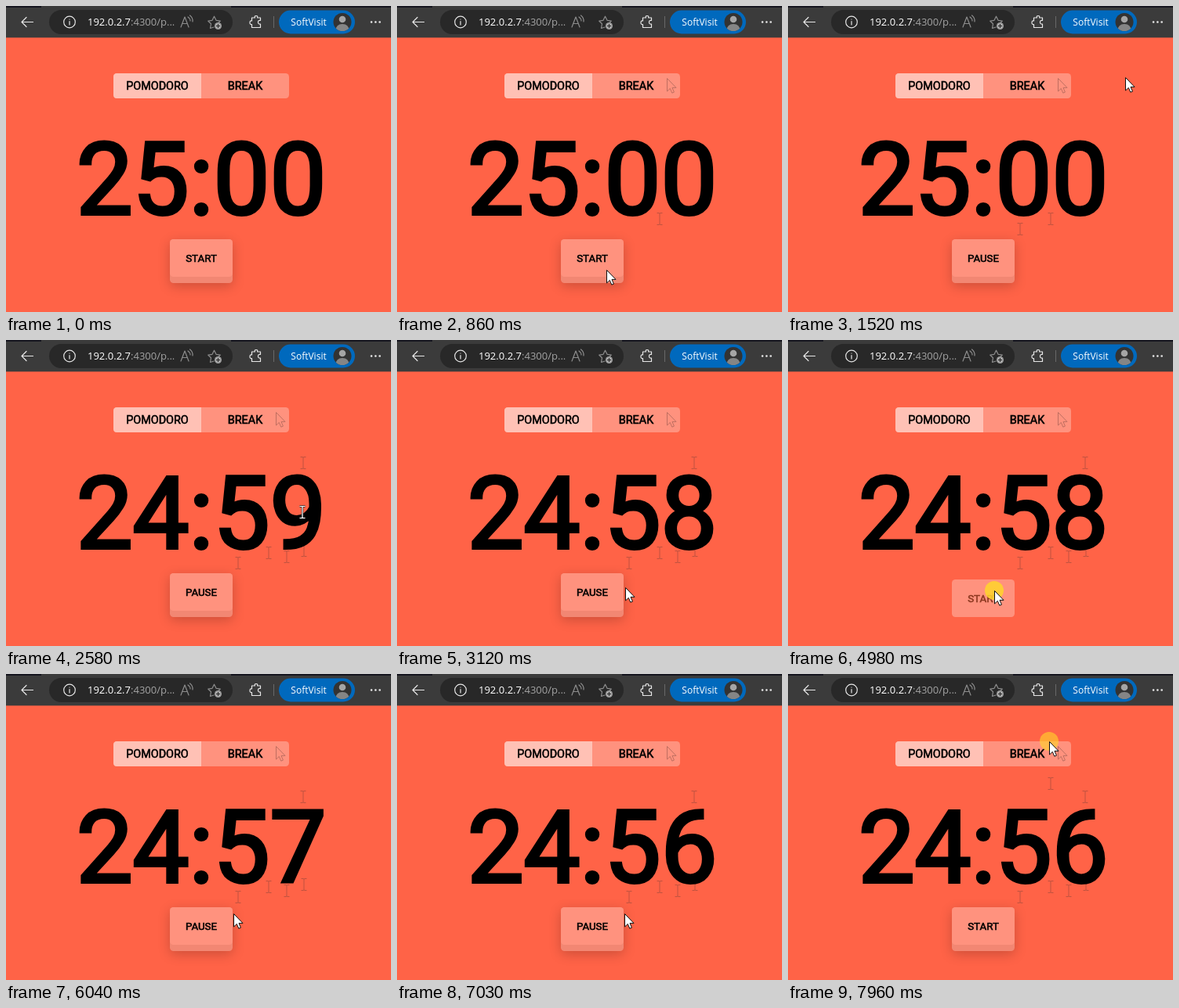
An HTML page for the animation above (8000 ms loop, 491 px wide and 391 px high).

```html
<!DOCTYPE html>
<html lang="en">
<head>
<meta charset="utf-8">
<title>Pomodoro timer</title>
<style>
  html, body { margin: 0; width: 100%; height: 100%; overflow: hidden; background: #ff6347; }
  svg { display: block; width: 100%; height: 100%; }
  .ui { font-family: "Open Sans", "Noto Sans", sans-serif; }
  .line { fill: none; stroke: #e6e6e6; stroke-width: 1.2; stroke-linecap: round; stroke-linejoin: round; }
  .dim { stroke: #8c8c8c; }
  /* Regular weight thickened by an outline, like a synthetic bold */
  .app { font-family: Roboto, sans-serif; font-weight: 400; text-anchor: middle; stroke-linejoin: miter; }
  .tab { font-size: 14.4px; stroke: #000; stroke-width: .57; }
  #label { font-size: 13.333px; stroke-width: .54; }
  #clock { font-size: 128px; stroke: #000; stroke-width: 4; }
</style>
</head>
<body>
<svg viewBox="0 0 491 391" xmlns="http://www.w3.org/2000/svg">
  <defs>
    <filter id="soft" x="-50%" y="-50%" width="200%" height="200%"><feGaussianBlur stdDeviation="8"/></filter>
    <clipPath id="face"><circle cx="429" cy="20.5" r="11.5"/></clipPath>
    <path id="arrow" d="M.5 .5V17L4.300 13.400 6.800 19.200 9.400 18.100 7 12.400H12Z"/>
    <path id="beam" d="M-3.5 -7.5H-1Q0 -7.5 0 -6.5Q0 -7.5 1 -7.5H3.5M0 -6.5V6.5M-3.5 7.5H-1Q0 7.5 0 6.5Q0 7.5 1 7.5H3.5" fill="none"/>
  </defs>

  <rect width="491" height="391" fill="#ff6347"/>

  <g class="ui">
    <rect width="491" height="40.400" fill="#3b3b3b"/>
    <path d="M0 0H45V2H0ZM287 0H491V2H287Z" fill="#15151f"/>
    <rect x="55" y="5" width="234" height="31" rx="15.5" fill="#282828"/>
    <path class="line" d="M34.500 20.500H20M26 14.500L20 20.500L26 26.500"/>
    <circle class="line" cx="81" cy="20.500" r="7.300"/>
    <path class="line" d="M81 19.500V24M81 17V17.100"/>
    <text x="104" y="25" font-size="13" fill="#fff">192.0.2.7<tspan fill="#a3a3a3">:4300/p...</tspan></text>
    <path class="line dim" d="M223 27L228 14L233 27M225 22.500H231M232 14Q235 16 235 19M234.500 12Q238.500 15 238 20"/>
    <path class="line dim" d="M265 27L260.500 28.500L261.500 22.700L257.800 19.200L263 18.300L265.500 13.200L268 18.300L273.300 19.200L271 21.500"/>
    <circle cx="270.500" cy="25.500" r="4.500" fill="#a3a3a3"/>
    <path d="M268 25.500H273M270.500 23V28" stroke="#282828"/>
    <path class="line" transform="translate(1.500 0)" d="M312 15H316Q315 12.500 317.500 12.500T319 15H323V18.500Q320 18 320 20.700T323 23V27.500H312V23.500Q309.500 24 309.500 21.200T312 19Z"/>
    <path d="M341.500 13V28" stroke="#686868"/>
    <rect x="348" y="5.500" width="97" height="30" rx="15" fill="#0069bd"/>
    <text x="386" y="25" font-size="12" fill="#fff" text-anchor="middle">SoftVisit</text>
    <g clip-path="url(#face)">
      <rect x="417" y="8" width="24" height="25" fill="#333"/>
      <circle cx="429" cy="17" r="4.300" fill="#a5a5a5"/>
      <path d="M420 34Q420 23 429 23T438 34Z" fill="#858585"/>
    </g>
    <path class="line" d="M466 20.500h.1m5.200 0h.1m5.200 0h.1" style="stroke-width:2.600"/>
  </g>

  <g class="app">
    <rect x="137" y="86" width="224" height="32" rx="4.500" fill="#ff927e"/>
    <path d="M249 86H141.500Q137 86 137 90.500V113.500Q137 118 141.500 118H249Z" fill="#ffc1b5"/>
    <text class="tab" x="193" y="107">POMODORO</text>
    <text class="tab" x="305" y="107">BREAK</text>

    <g id="raised">
      <rect x="209" y="302" width="80" height="56" rx="4.500" opacity=".2" filter="url(#soft)"/>
      <rect x="209" y="298" width="80" height="56" rx="4.500" fill="#f28773"/>
    </g>
    <g id="button">
      <rect x="209" y="298" width="80" height="48" rx="4.500" fill="#ff927e"/>
      <text id="label" x="249" y="327"></text>
    </g>
  </g>

  <g id="trail" stroke="#5f3a35" fill="none" opacity=".4"></g>
  <text id="clock" class="app" x="249" y="266"></text>

  <circle id="ring" r="12" fill="#ffd52a"/>
  <g id="pointer">
    <use id="hand" href="#arrow" fill="#fff" stroke="#111"/>
    <g id="caret"><use href="#beam" stroke="#222" stroke-width="2.600"/><use href="#beam" stroke="#fff" stroke-width="1.200"/></g>
  </g>
</svg>

<script>
const LOOP = 8000, STEP = 66.33, SECOND = 15;
const $ = id => document.getElementById(id);

// Each sweep carries the pointer through its points at an even pace, then rests
const sweeps = [
  { from: 4, to: 9, via: [[472, 40], [344, 92], [335, 272], [267, 337]] },
  { from: 16, to: 23, via: [[296, 285], [430, 91]] },
  { from: 32, to: 39, via: [[379, 157], [380, 269], [358, 277], [378, 220]] },
  { from: 41, to: 46, via: [[291, 316]] },
  { from: 49, to: 51, via: [[263, 320]] },
  { from: 79, to: 82, via: [[290, 306]] },
  { from: 108, to: 110, via: [[267, 332]] },
  { from: 113, to: 119, via: [[335, 140], [333, 86]] }
];
sweeps.forEach((s, i) => {
  s.points = i ? [sweeps[i - 1].points.at(-1), ...s.via] : s.via;
});

// Steps at which the timer starts and stops; the button is held just before
const runs = [[16, 53], [76, 113]];
const switches = runs.flat();
const clicks = [...switches.map(s => s - 1), 119];

const overText = (x, y) => x < 400 && y > 125 && y < 290;
const place = (el, [x, y]) => el.setAttribute("transform", `translate(${x} ${y})`);
const show = (el, on) => el.setAttribute("display", on ? "inline" : "none");

// Every turning point leaves a faint mark once the pointer has passed
const marks = sweeps.flatMap(({ from, to, points }) =>
  points.slice(1, -1).map((point, i) => {
    const el = document.createElementNS("http://www.w3.org/2000/svg", "use");
    el.setAttribute("href", overText(...point) ? "#beam" : "#arrow");
    place(el, point);
    $("trail").append(el);
    return { el, step: from + (to - from) * (i + 1) / (points.length - 1) };
  }));

function pointerAt(step) {
  const { from, to, points } = sweeps.findLast(s => step >= s.from) || sweeps[0];
  const last = points.length - 1;
  const pos = last * Math.min(1, Math.max(0, (step - from) / (to - from)));
  const i = Math.min(last - 1, Math.floor(pos));
  return points[i].map((v, axis) => v + (points[i + 1][axis] - v) * (pos - i));
}

function clockText(step) {
  const spent = runs.reduce((sum, [a, b]) =>
    sum + Math.max(0, Math.floor((Math.min(step, b) - a) / SECOND)), 0);
  const left = 25 * 60 - spent;
  return [Math.floor(left / 60), left % 60].map(n => String(n).padStart(2, "0")).join(":");
}

function draw(time) {
  const step = Math.floor((time + 10) / STEP);
  const point = pointerAt(step);
  const text = overText(...point);

  $("clock").textContent = clockText(step);

  const held = switches.includes(step + 1);
  const ink = held ? "#8c3820" : "#000";
  show($("raised"), !held);
  place($("button"), [0, held ? 8 : 0]);
  $("label").setAttribute("fill", ink);
  $("label").setAttribute("stroke", ink);
  $("label").textContent = runs.some(([a, b]) => step >= a && step < b) ? "PAUSE" : "START";

  for (const m of marks) show(m.el, step > m.step);

  show($("pointer"), step >= sweeps[0].from);
  show($("hand"), !text);
  show($("caret"), text);
  place($("pointer"), point);

  const age = step - (clicks.findLast(c => step >= c) ?? -99);
  place($("ring"), point);
  $("ring").setAttribute("opacity", Math.max(0, .85 - .23 * age));
}

const start = performance.now();
function frame() {
  draw((performance.now() - start) % LOOP);
  requestAnimationFrame(frame);
}
frame();
</script>
</body>
</html>
```
